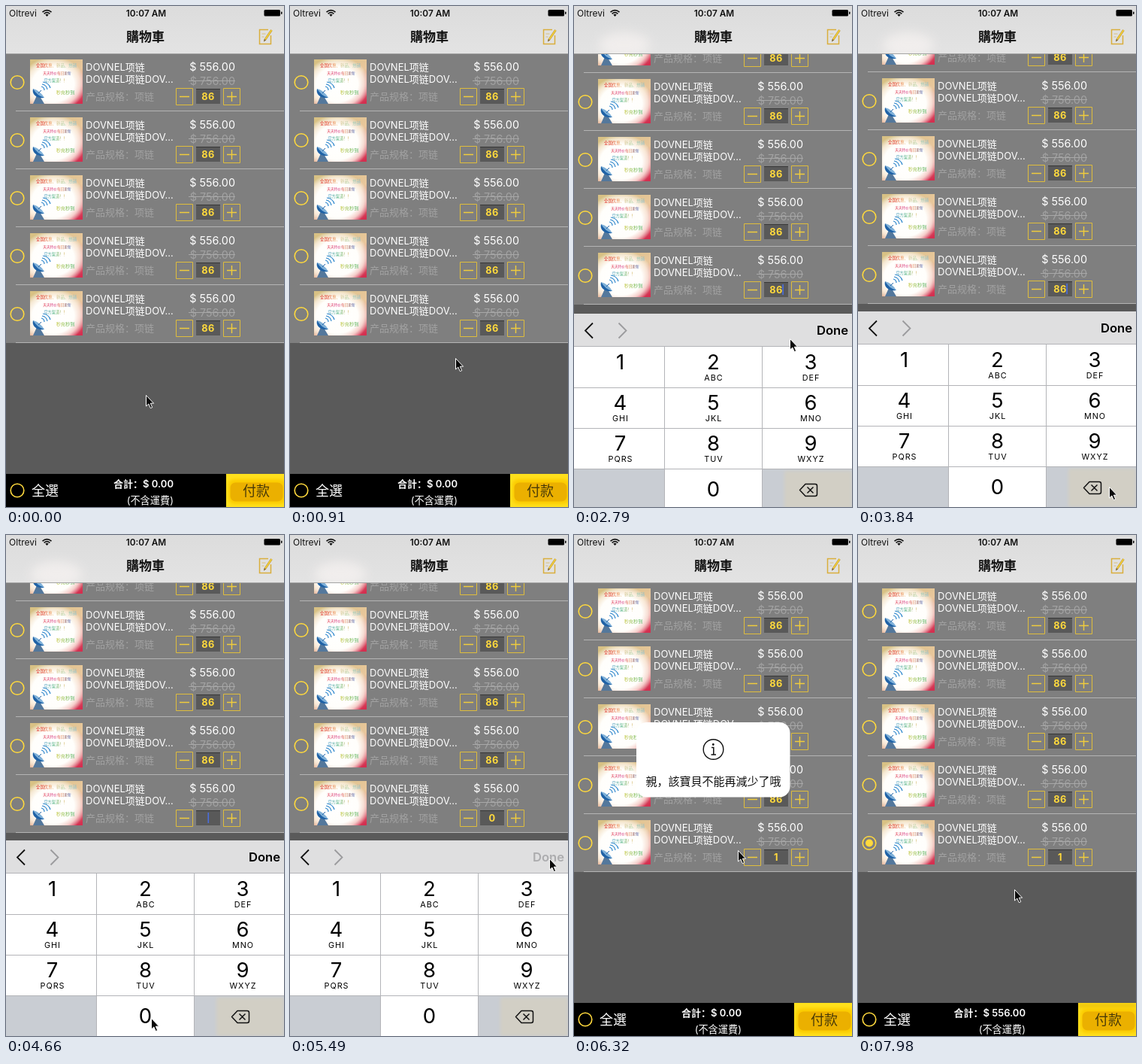
Recreate the animation shown at these times as an HTML page. Size 370 by 666 pixels, loop 8000 ms.

```html
<!DOCTYPE html>
<html lang="zh">
<head>
<meta charset="utf-8">
<title>購物車</title>
<style>
  html, body { margin: 0; width: 100%; height: 100%; overflow: hidden; background: #5a5a5a; }
  svg { display: block; width: 100%; height: 100%; }
  text { font-family: Inter, "Noto Sans CJK SC", "Noto Sans CJK", sans-serif; white-space: pre; }
  .mid { text-anchor: middle; }
  .end { text-anchor: end; }
  .semi { font-weight: 600; }
  .bold { font-weight: 700; }
  .line { fill: none; }
</style>
</head>
<body>
<svg id="stage" viewBox="0 0 370 666"></svg>
<script>
const GOLD = '#ffd93d';
const FRAME = '#dfbd3c';
const $ = id => document.getElementById(id);

const text = (x, y, size, fill, str, cls = '', more = '') =>
  `<text x="${x}" y="${y}" font-size="${size}" fill="${fill}" class="${cls}" ${more}>${str}</text>`;
const rect = (x, y, w, h, fill, more = '') =>
  `<rect x="${x}" y="${y}" width="${w}" height="${h}" fill="${fill}" ${more}/>`;
const path = (d, stroke, width = 1, more = '') =>
  `<path d="${d}" class="line" stroke="${stroke}" stroke-width="${width}" ${more}/>`;
const ring = (x, y) =>
  `<circle cx="${x}" cy="${y}" r="8.8" class="line" stroke="${GOLD}" stroke-width="1.6"/>`;
const stops = list => list.map(([at, color, alpha = 1]) =>
  `<stop offset="${at}" stop-color="${color}" stop-opacity="${alpha}"/>`).join('');

const defs = `<defs>
  <linearGradient id="warm" x1=".2" y1="0" x2=".9" y2="1">${
    stops([[0, '#d8c184'], [.5, '#e9c79d'], [.75, '#e08a86'], [1, '#d42f50']])}</linearGradient>
  <radialGradient id="shine" cx=".44" cy=".56" r=".62">${
    stops([[0, '#fff'], [.64, '#fffefb'], [.82, '#fff6ec', .75], [1, '#fff', 0]])}</radialGradient>
  <linearGradient id="rainbow">${
    stops([[0, '#d22'], [.18, '#e0402a'], [.4, '#f0b878'], [.7, '#a4d0a0'], [1, '#84bcd0']])}</linearGradient>
  <linearGradient id="berry">${
    stops([[0, '#e03040'], [.4, '#d84090'], [.65, '#e07030'], [1, '#3a62c0']])}</linearGradient>
  <linearGradient id="leaf">${
    stops([[0, '#4a9ac8'], [.5, '#58b878'], [1, '#f0a030']])}</linearGradient>
  <linearGradient id="lime">${stops([[0, '#c8c840'], [1, '#48b060']])}</linearGradient>
  <linearGradient id="bar" x2="0" y2="1">${stops([[0, '#dcdcdc'], [1, '#e3e3e3']])}</linearGradient>
  <filter id="soft" x="-30%" y="-60%" width="160%" height="220%"><feGaussianBlur stdDeviation="2"/></filter>
  <filter id="haze" x="-50%" y="-50%" width="200%" height="200%"><feGaussianBlur stdDeviation="7"/></filter>
  <clipPath id="navClip">${rect(0, 0, 370, 63, '#000')}</clipPath>
  <clipPath id="payClip">${rect(293, 622, 77, 44, '#000')}</clipPath>
</defs>`;

const thumb = `<g id="thumb">
  ${rect(0, 0, 70, 59, 'url(#warm)')}${rect(0, 0, 70, 59, 'url(#shine)')}
  ${text(35, 10, 5.4, 'url(#rainbow)', '全国优惠、新品、热销', 'mid')}
  ${text(36, 20, 4.7, 'url(#berry)', '天天特价每日更新', 'mid')}
  ${text(34, 30, 5.2, 'url(#leaf)', '官方渠道！！', 'mid')}
  ${text(47, 45.5, 6.2, 'url(#lime)', '秒充秒到', 'mid')}
  <path d="M9 48L4 59H19L13 49Z" fill="#54789c"/>
  <path d="M4 39C2 47 9 52 19 51Z" fill="#1f62a6"/>
  <path d="M4 39Q13 41 19 51Q9 48 4 39Z" fill="#7fb0d8"/>
  ${path('M11 45L15 41', '#1f62a6')}
  ${path('M15 36Q19 37 19 41M16 33Q22 34 23 40M17 30Q25 31 27 38', '#2c86cc', 1.2)}
</g>`;

const row = i => `<g transform="translate(0 ${63 + 77 * i})">
  ${ring(15, 38.5)}
  ${i === 4 ? `<circle id="dot" cx="15" cy="38.5" r="5" fill="${GOLD}"/>` : ''}
  <g transform="translate(32 8)">${i ? '<use href="#thumb"/>' : thumb}</g>
  ${text(106, 22.5, 13, '#fff', 'DOVNEL项链')}
  ${text(106, 38.5, 13, '#fff', 'DOVNEL项链DOV…')}
  ${text(106, 61.5, 13, '#a2a2a2', '产品规格：项链', '', 'font-weight="300"')}
  ${text(305, 22.5, 14.4, '#fff', '$ 556.00', 'end')}
  ${text(305, 41.5, 14.4, '#a2a2a2', '$ 756.00', 'end')}
  ${path('M243 36.5H305', '#a8a8a8')}
  ${path('M226.5 46.5h22v22h-22zM289.5 46.5h22v22h-22z', FRAME)}
  ${path('M231 57.5h13M294 57.5h13M300.5 51v13', '#f0cc3c', 1.4)}
  ${rect(253, 47, 32, 20, '#595959')}${path('M253 47.5h32', '#383838')}
  ${text(269, 62, 12.8, GOLD, '86', 'mid bold', `letter-spacing=".4" ${i === 4 ? 'id="qty"' : ''}`)}
  ${i === 4 ? rect(277, 50, 1.6, 14, '#4a6ee0', 'id="caret"') : ''}
  ${path('M13 76.5H370', '#b4b4b4')}
</g>`;

const list = `<g id="list">${rect(0, 63, 370, 385, '#7f7f7f')}${[0, 1, 2, 3, 4].map(row).join('')}</g>`;

const nav = `${rect(0, 0, 370, 63, 'url(#bar)')}
  <g clip-path="url(#navClip)"><ellipse id="glow" cx="67" cy="52" rx="34" ry="17" fill="#fbf6f4" filter="url(#haze)"/></g>
  ${path('M0 63.5H370', '#a4a4a4')}
  ${text(4, 13.8, 12, '#111', 'Oltrevi')}
  ${path('M48.5 8.2Q54.5 3 60.5 8.2M50.6 10.3Q54.5 7 58.4 10.3', '#111', 1.6)}
  <path d="M52.3 11.6Q54.5 9.8 56.7 11.6L54.5 14Z" fill="#111"/>
  ${text(186.5, 13.8, 11.8, '#111', '10:07 AM', 'mid semi')}
  ${rect(343.5, 5, 21.5, 8.5, '#000', 'rx="1.5"')}${rect(366, 7.5, 1.5, 3.5, '#000', 'rx=".7"')}
  ${text(185.5, 47, 17, '#111', '購物車', 'mid bold')}
  ${path('M349 31.5H337.5V50.5H352.5V39', '#d9ae3c', 1.5)}
  ${path('M340.5 37h5M340.5 41h3', '#d8c078')}
  ${path('M353.5 32L345 44.5', '#b8902c', 2.8)}${path('M353.5 32L345 44.5', '#f4d13d', 1.6)}
  <path d="M343.7 43.8L346.2 45.5L343 47.5Z" fill="#80642a"/>`;

const footer = `${rect(0, 622, 370, 44, '#000')}${ring(15, 644)}
  ${text(34, 650.5, 18, '#fff', '全選')}
  ${text(223, 640, 13, '#fff', '', 'end semi', 'id="total"')}
  ${text(223, 661.5, 13.2, '#fff', '(不含運費)', 'end')}
  <g clip-path="url(#payClip)">${rect(293, 622, 77, 44, '#ffe01c')}
  ${rect(293, 622, 77, 7, '#e0b000', 'id="shade" filter="url(#soft)"')}
  ${rect(296, 629, 76, 33, '#fbcb00', 'rx="8" filter="url(#soft)"')}
  ${rect(298.5, 633.5, 70, 25, '#ebb000', 'rx="7"')}</g>
  ${text(333, 650.5, 18, '#493a08', '付款', 'mid')}`;

const columns = [61.5, 185.5, 315];
const letters = ['', 'ABC', 'DEF', 'GHI', 'JKL', 'MNO', 'PQRS', 'TUV', 'WXYZ'];
const key = (sub, i) => {
  const x = columns[i % 3], y = 450 + 54 * Math.floor(i / 3);
  return text(x, y + 30, 27.5, '#000', i + 1, 'mid') +
    text(x + .5, y + 45.3, 10.8, '#000', sub, 'mid', 'letter-spacing="1"');
};
const keyboard = `<g id="keyboard">
  ${rect(0, 406, 370, 44, '#dfdfe0')}
  ${path('M25 418.5L15 428.5L25 438.5', '#111', 1.8)}
  ${path('M59.5 418.5L69.5 428.5L59.5 438.5', '#9b9b9d', 1.8)}
  ${text(365, 434, 16.6, '#000', 'Done', 'end semi', 'id="done"')}
  ${rect(0, 450, 370, 216, '#fff')}
  ${rect(0, 612, 120, 54, '#c9cdd3')}${rect(251, 612, 119, 54, '#c9cdd3')}
  ${rect(280, 615, 90, 51, '#d2cfc5', 'filter="url(#soft)"')}
  ${rect(251, 612, 119, 54, '#fff', 'id="keyDel"')}${rect(121, 612, 130, 54, '#c9cdd3', 'id="keyZero"')}
  ${path('M0 449.5H370M0 504.5H370M0 558.5H370M0 612.5H370M120.5 450V666M250.5 450V666', '#b3b4b8')}
  ${letters.map(key).join('')}
  ${text(185.5, 649, 27.5, '#000', '0', 'mid')}
  ${path('M300.5 640.5L308 632.5H321Q323.5 632.5 323.5 635V646Q323.5 648.5 321 648.5H308ZM310.5 636.5l8 8m0-8l-8 8',
    '#111', 1.5, 'stroke-linejoin="round"')}
</g>`;

const toast = `<g id="toast">${rect(83, 249, 204.5, 99.5, '#fff', 'rx="14"')}
  <circle cx="185.5" cy="285" r="13.3" class="line" stroke="#111" stroke-width="1.4"/>
  <circle cx="185.3" cy="278.5" r="1.4" fill="#111"/>
  ${path('M183 282.5h2.8V291.5M182.5 292h6.5', '#111', 1.5)}
  ${text(185.5, 333, 15, '#111', '親，該寶貝不能再減少了哦', 'mid')}</g>`;

const cursor = `<path id="cursor" d="M.5 .5V15L3.8 12L6.3 17.6L8.7 16.6L6.3 11.2H10.6Z"
  fill="#0a0a0a" stroke="#fff" stroke-width="1"/>`;

$('stage').innerHTML = defs + rect(0, 0, 370, 666, '#5a5a5a') + list + nav + footer + keyboard + toast + cursor;

// [start ms, pointer x, pointer y, what else changes]
const steps = [
  [0, 186, 517, { up: 0, toast: 0, qty: '86', caret: 0, press: '', picked: false }],
  [500, 181, 510], [710, 197, 490], [910, 220, 468],
  [1750, 232, 461], [1960, 262, 445], [2160, 278, 433], [2370, 279, 432],
  [2580, 279, 432, { up: .6, caret: 1 }],
  [2790, 287, 442, { up: .988 }],
  [3000, 300, 480, { up: 1 }],
  [3210, 316, 545], [3420, 328, 605], [3630, 334, 636], [3840, 334, 639],
  [4040, 334, 639, { qty: '8', press: 'del' }],
  [4250, 334, 639, { qty: '' }],
  [4460, 262, 641, { press: '' }],
  [4660, 193, 642],
  [4870, 190, 641, { qty: '0', press: 'zero' }],
  [5080, 232, 590, { press: '' }],
  [5280, 325, 462],
  [5490, 345, 430, { press: 'done', caret: 0 }],
  [5700, 344, 430, { press: '', up: .4, qty: '1', toast: .5 }],
  [5900, 322, 428, { up: 0, toast: 1 }],
  [6110, 268, 424], [6320, 218, 419], [6530, 160, 415], [6730, 92, 411],
  [6940, 34, 408, { toast: .4 }],
  [7150, 16, 407, { toast: 0 }],
  [7360, 15, 407, { picked: true }],
  [7560, 32, 415], [7770, 85, 439], [7980, 208, 471]
];
let last = {};
const states = steps.map(([at, x, y, change]) => last = { ...last, ...change, at, x, y });

const set = (id, name, value) => $(id).setAttribute(name, value);
const move = (id, x, y) => set(id, 'transform', `translate(${x} ${y})`);

function draw(s) {
  move('cursor', s.x, s.y);
  move('list', 0, -Math.round(52 * s.up));
  move('keyboard', 0, Math.round(260 * (1 - s.up)));
  set('keyboard', 'visibility', s.up ? 'visible' : 'hidden');
  set('glow', 'opacity', s.up * .6);
  set('toast', 'opacity', s.toast);
  set('caret', 'opacity', s.caret);
  set('caret', 'x', 268.5 + 4.4 * s.qty.length);
  $('qty').textContent = s.qty;
  set('keyDel', 'opacity', +(s.press === 'del'));
  set('keyZero', 'opacity', +(s.press === 'zero'));
  set('done', 'fill', s.press === 'done' ? '#acacae' : '#000');
  set('dot', 'opacity', +s.picked);
  set('shade', 'opacity', s.picked ? .5 : 0);
  $('total').textContent = `合計：$ ${s.picked ? '556.00' : '0.00'}`;
}

let shown;
function tick() {
  const now = performance.now() % 8000;
  const state = states.findLast(s => s.at <= now);
  if (state !== shown) draw(shown = state);
  requestAnimationFrame(tick);
}
tick();
</script>
</body>
</html>
```
